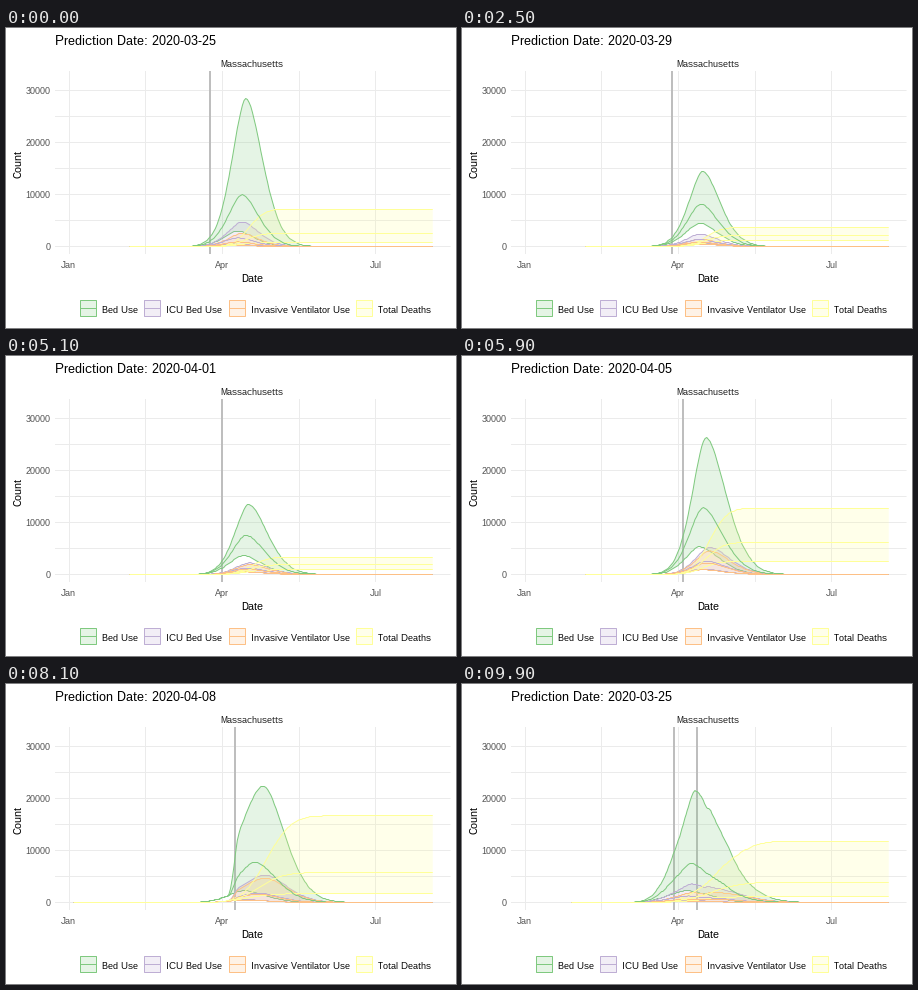
Write a matplotlib script that moves like this. It is 450 by 300 pixels and loops after 10000 ms.

```python
import numpy as np
import matplotlib.pyplot as plt
from matplotlib.animation import FuncAnimation
from matplotlib.patches import Rectangle

W, H, DPI = 450, 300, 100
PX = 72 / DPI
FRAMES, INTERVAL, STEPS = 100, 100, 4

DAY0, PER_DAY, LAST_DAY = 62.8, 1.685, 216
Y0, PER_COUNT = 218.5, 0.0052
LEFT, RIGHT, TOP, BOTTOM = 49, 444.5, 43, 226
APRIL, FIRST = 91, 84

SERIES = [("Bed Use", "#7FC97F", 74), ("ICU Bed Use", "#BEAED4", 138),
          ("Invasive Ventilator Use", "#FDC086", 223),
          ("Total Deaths", "#FFFF99", 350)]

# days of the year with a prediction, and those that bring a new forecast
DAYS = [84, 85, 86, 88, 89, 90, 91, 95, 97, 98, 100, 102]
RELEASES = [d for d in DAYS if d not in (85, 86, 97)]

# key points: highest bed use and deaths, and mean relative to highest
KEY_DAYS = [84, 88, 89, 91, 95, 98, 102]
BEDS = [28500, 9800, 9900, 14000, 30500, 23300, 17500]
DEATHS = [7200, 2500, 2400, 3500, 15800, 15400, 25500]
MEAN = [0.35, 0.78, 0.73, 0.54, 0.48, 0.35, 0.31]


def day_x(day):
    return DAY0 + PER_DAY * day


def bell(x, c, left, right):
    z = np.abs(x - c) / np.where(x < c, left, right)
    return np.exp(-0.5 * z ** 1.75)


def cumulative(x, c, s):
    z = (x - c) / s
    return 0.5 * (1 + np.tanh(0.798 * (z + 0.0447 * z ** 3)))


def forecast(day):
    """Four series, each with rows x, high, mean, low."""
    beds, deaths, mean = (np.interp(day, KEY_DAYS, v) for v in (BEDS, DEATHS, MEAN))
    age = day - FIRST
    late = day > 97  # these follow the observed counts up to their date
    x = day_x(np.arange(3 if late else 36, LAST_DAY + 1))
    scale = np.array([1, mean, 0.85 * mean ** 2])
    icu = beds * 0.165 + (deaths - 0.25 * beds) * 0.145
    vent = icu * (0.9 - 0.37 * np.exp(-RELEASES.index(day) / 2))

    right = 16 + 0.3 * age
    if late:
        c = 256 + 3 * (day - 98)
        centers, lefts = (c, c - 8, 238), (24, 19, 15)
    else:
        c = 240 + 0.4 * age
        centers = (c, c - 6 * (1 - mean), c - 13 * (1 - mean))
        lefts = (13.5,) * 3

    def bands(peak, shift):
        hi, mid, lo = (peak * s * bell(x, m + shift, w, right)
                       for s, m, w in zip(scale, centers, lefts))
        if late:
            u = np.clip((x - day_x(day) + 6) / 10, 0, 1)
            u = u * u * (3 - 2 * u)
            mid, hi = lo + (mid - lo) * u, lo + (hi - lo) * u
        mid = np.maximum(mid, lo)
        return np.array([x, np.maximum(hi, mid), mid, lo])

    shift = 2 if late else -4 + 0.7 * age
    spread = 0.43 * (lefts[0] + right)
    total = [deaths * s * cumulative(x, m + 3, spread)
             for s, m in zip(scale, centers)]
    return [bands(beds, 0), bands(icu, shift), bands(vent, shift),
            np.array([x] + total)]


def stretch(series, n):
    """Split the longest steps until the series has n points."""
    size = series.shape[1]
    if size >= n:
        return series
    steps = np.hypot(np.diff(series[2]), 1)
    parts = np.ones(size - 1, int)
    for _ in range(n - size):
        parts[np.argmax(steps / parts)] += 1
    at = np.concatenate([i + np.arange(p) / p for i, p in enumerate(parts)]
                        + [[size - 1]])
    return np.array([np.interp(at, np.arange(size), r) for r in series])


def blend(a, b, t):
    n = max(a.shape[1], b.shape[1])
    return (1 - t) * stretch(a, n) + t * stretch(b, n)


CURVES = {day: forecast(day) for day in RELEASES}


def curves(day):
    return CURVES[max(r for r in RELEASES if r <= day)]


plt.rcParams.update({"font.family": "Liberation Sans", "text.hinting": "native",
                     "text.hinting_factor": 1})
fig = plt.figure(figsize=(W / DPI, H / DPI), dpi=DPI, facecolor="white")
ax = fig.add_axes([0, 0, 1, 1])
ax.set_xlim(0, W)
ax.set_ylim(H, 0)
ax.axis("off")


def line(xs, ys, color, width=1, z=1):
    return ax.plot(xs, ys, color=color, lw=width * PX, snap=False,
                   solid_capstyle="butt", zorder=z)[0]


def label(x, y, s, size, color="black", **kw):
    kw.setdefault("va", "baseline")
    return ax.text(x, y, s, fontsize=size * PX, color=color, **kw)


def pixel_row(y):
    return np.floor(y) + 0.5


for v in range(0, 30001, 5000):
    y = Y0 - v * PER_COUNT
    line([LEFT, RIGHT], [y, y], "#EBEBEB")
    if v % 10000 == 0:
        label(44.5, y + 3.5, str(v), 9, "#4D4D4D", ha="right")
for i, s in enumerate(["Jan", "", "Apr", "", "Jul"]):
    x = day_x(APRIL * i / 2)
    line([round(x) + 0.5] * 2, [TOP, BOTTOM], "#EBEBEB")
    label(x, 240, s, 9, "#4D4D4D", ha="center")

title = label(49, 17, "", 13)
label(245.5, 39, "Massachusetts", 9, "#1A1A1A", ha="center")
label(246, 254, "Date", 11, ha="center")
label(12, 136, "Count", 11, rotation=90, ha="center", va="center")

fills, edges = [], []
for i, (name, color, x) in enumerate(SERIES):
    ax.add_patch(Rectangle((x, 272), 17, 17, fc=color, alpha=0.2, lw=0))
    ax.add_patch(Rectangle((x + 0.5, 272.5), 16, 16, fill=False, ec=color,
                           lw=PX, snap=False))
    line([x, x + 17], [280.5, 280.5], color)
    label(x + 22, 285, name, 9)
    z = 3 + i / 10
    fills += ax.fill([0, 0], [0, 0], color=color, alpha=0.2, lw=0, zorder=z)
    edges.append([line([], [], color, z=k) for k in (z + 0.05, z + 1, z + 0.05)])

markers = [line([0, 0], [TOP, BOTTOM], "#BEBEBE", 2, 2) for _ in range(2)]


def start(j):
    return 5 + 8 * j + min(j, 4)


def draw(i):
    count = len(DAYS)
    j = sum(start(k) <= i for k in range(count)) - 1
    t = 1.0 if j < 0 else min((i - start(j) + 1) / STEPS, 1.0)
    old, new = DAYS[j % count], DAYS[(j + 1) % count]

    shown = new if t > 0.5 else old
    date = f"04-{shown - APRIL + 1:02d}" if shown >= APRIL else f"03-{shown - 59}"
    title.set_text("Prediction Date: 2020-" + date)

    # the last marker stays behind while the loop wraps
    day = old + (new - old) * t
    for mark, d in zip(markers, (day, max(day, old) if new < old and t < 1 else day)):
        mark.set_xdata([round(day_x(d))] * 2)

    for fill, lines, a, b in zip(fills, edges, curves(old), curves(new)):
        x, *ys = b if t == 1 else blend(a, b, t)
        ys = [pixel_row(Y0 - y * PER_COUNT) for y in ys]
        fill.set_xy(np.column_stack([np.r_[x, x[::-1]],
                                     np.r_[ys[0], ys[2][::-1]]]))
        for edge, y in zip(lines, ys):
            edge.set_data(x, y)
    return []


anim = FuncAnimation(fig, draw, frames=FRAMES, interval=INTERVAL,
                     init_func=lambda: draw(0), repeat=True, repeat_delay=0)
plt.show()
```
